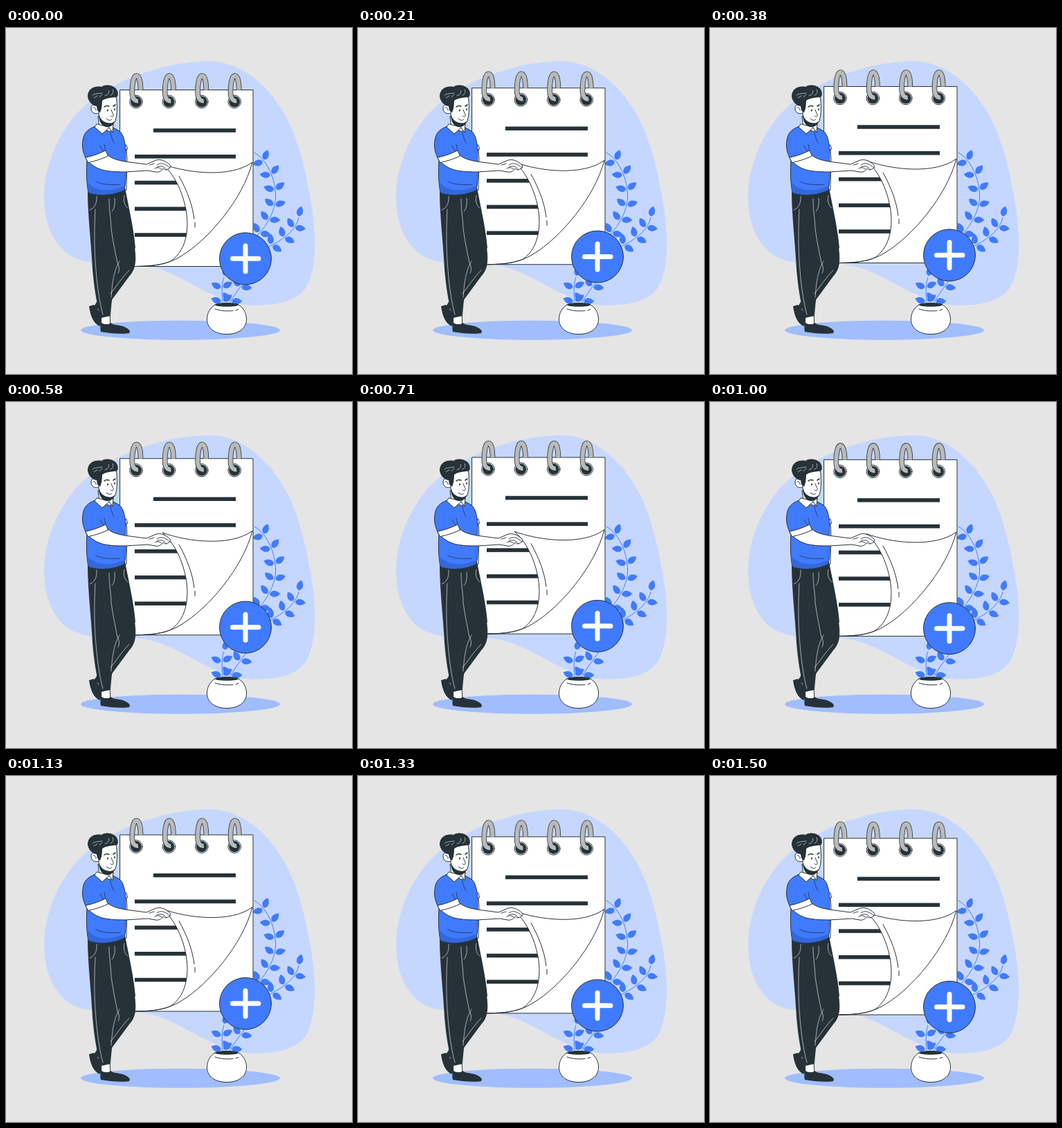
An HTML page for the animation above (1540 ms loop, 500 px wide and 500 px high).

```html
<!DOCTYPE html>
<html lang="en">
<head>
<meta charset="utf-8">
<title>Notepad</title>
<style>
  html, body { margin: 0; height: 100%; overflow: hidden; background: #e5e5e5; }
  svg { display: block; width: 100%; height: 100%; }
  .ink { fill: #263238; }
  .blue { fill: #407bff; }
  .shade { fill: #3467d8; }
  .paper { fill: #fff; }
  .edge { stroke: #263238; stroke-linejoin: round; stroke-linecap: round; }
  .line { fill: none; stroke: #263238; stroke-linecap: round; stroke-linejoin: round; }
  .seam { fill: none; stroke: #dfe3e5; stroke-width: .7; stroke-linecap: round; }
  .stem { fill: none; stroke: #407bff; }
  .wire { fill: none; }
</style>
</head>
<body>
<svg viewBox="0 0 500 500">
  <defs>
    <path id="leaf" d="M2 0C3-5 10-8 17 0C11 6 4 5 2 0Z"/>
    <path id="wire" class="wire" d="M6.500 89.500C6.500 77 4 69 .5 69C-4 69-6 82-5.700 94C-5.500 102-2 106 3 105.500"/>
    <g id="ring">
      <circle class="paper edge" cy="106.500" r="9.300"/>
      <circle class="ink" cy="106.500" r="8"/>
      <use href="#wire" stroke="#263238" stroke-width="7.600"/>
      <use href="#wire" stroke="#bababa" stroke-width="6"/>
    </g>
  </defs>

  <path fill="#c6d7ff" d="M290 48C340 46 380 84 404 127C425 166 435 215 442 258C449 305 448 350 434 374C421 396 385 403 345 400C290 390 260 360 215 346C190 338 160 339 120 338C78 333 55 295 55 243C56 200 72 160 100 126C128 96 170 72 215 60C240 52 265 49 290 48Z"/>
  <ellipse cx="252" cy="436.700" rx="144" ry="14" fill="#a0bdff"/>

  <g id="plant"></g>

  <g id="pad">
    <path class="paper edge" d="M165 89.500H357V344.500H165Z"/>
    <g id="bars" class="ink"></g>
    <path class="paper" d="M226 196.500C262 210 325 217 356 194C342 248 292 306 238 338C264 319 264 284 260 262C255 236 243 211 226 196.500Z"/>
    <path class="line" d="M187 344.500C214 344 226 342 238 337C264 319 264 284 260 262C255 236 243 211 226 196.500C262 210 325 217 356 194C342 248 292 306 254 329C236 341 214 344.500 187 344.500M250 214C262 236 269 254 272 276M273 281V288"/>
    <g id="rings"></g>
    <circle class="blue edge" cx="346" cy="333.300" r="37.500"/>
    <path d="M327.500 333.300H365M346 314.800V351.800" stroke="#fff" stroke-width="7" stroke-linecap="round"/>
  </g>

  <g id="pot">
    <path class="paper edge" d="M302 400C295 404 290.500 412 290.500 421C290.500 434 302 442.500 319 442.500C336 442.500 347.500 434 347.500 421C347.500 412 343 404 336 400C331 396.500 307 396.500 302 400Z"/>
    <ellipse class="ink" cx="319" cy="400.200" rx="16.500" ry="2.600"/>
    <path class="line" d="M302 406C310 409 320 409.500 328 408.500M332 408L336 406.500"/>
  </g>

  <g id="man">
    <path class="paper edge" d="M169 176L174 176C176 194 174 214 174 234L169 236Z"/>
    <path class="paper edge" d="M168 170L174 169L175.500 175.500L169 177Z"/>

    <path class="ink" d="M120 402L127 400L137 412L139 424L136 431C127 428 122 417 120 402Z"/>
    <path class="ink" d="M140 240L172 234C178 265 185 300 187 326C188 342 186 350 178 359L141 409L126 404L154 360Z"/>
    <path class="paper edge" d="M138 414L150 413L151 429L138 428Z"/>
    <path class="ink" d="M138 426C142 429 147 430 151 426C156 430 163 429 169 431C177 434 181 438 178 441C165 443 150 441 137 439C136 434 136 430 138 426Z"/>
    <path class="ink" d="M118 236L172 231C178 262 185 292 187 318L164 339C157 356 153 390 151 416L137 419C130 395 127 371 125 349C123 310 118 270 118 236Z"/>
    <path class="seam" d="M152 389C154 362 157 349 164 337M162 341C164 347 164 351 162 354M131 243C132 256 126 261 121 263M129 262C127 300 128 325 130 350C132 375 135 395 140 414M149 247C149 266 152 277 152 290C154 305 158 325 161 340M157 246C158 256 156 262 153 265M171 242C169 252 172 257 176 260M178 350C168 360 159 374 151 384"/>

    <path class="blue edge" d="M129 142C118 146 112 152 111 163C109 174 113 184 117 191C116 207 116 222 119 238C135 244 158 241 171 234C175 216 172 192 173 176C172 163 169 153 164 149L153 143Z"/>
    <path class="shade" d="M117 222C130 238 152 237 171.500 228L170.500 234C154 242 133 243 119 237.500Z"/>
    <path class="line" d="M130 222C141 227 153 227 165 226M142 168C143 174 144 178 144 181M151 151C152 158 154 162 156 166M136 170C138 174 140 177 142 179" stroke-width=".8"/>

    <path class="paper edge" d="M119 193L146 183C152 188 160 191 172 193L203 197L217 191C223 189 231 192 237 198C239 201 237 203 235 203C232 206 229 205 227 203C224 207 220 209 216 208L205 206L172 208C157 208 144 207 136 204C128 201 123 197 119 193Z"/>
    <path class="line" d="M218 198C223 194 229 195 237 202M218 201C224 198 228 200 232 205M215 203C220 200 224 203 226 205M207 198L214 196" stroke-width=".9"/>
    <path class="paper edge" d="M115 187C126 185 136 181 144 177L147.500 185C139 189 130 192 119 194.500Z"/>

    <path class="paper edge" d="M133 128L135 144L151 150L155 140Z"/>
    <path class="paper edge" d="M131 139L128 143L139 153L149 144L154 151L155 139L149 143Z"/>
    <path class="paper edge" d="M133 104C132 118 134 132 140 138C146 143 154 141 158 134C161 125 161 110 159 98L144 94Z"/>
    <path class="paper edge" d="M133 114C128 108 122 111 123 117C124 123 129 125 134 123Z"/>
    <path class="ink" d="M134 124C136 132 141 136 147 137C151 138 155 137 158 134C155 141 148 145 142 142C136 139 134 132 134 124Z"/>
    <path class="ink" d="M131 113C124 112 119 106 118 99C118 89 126 83 138 85C145 80 158 83 161 91C163 97 161 101 157 100C149 101 143 102 139 105C139 112 138 118 136 122L132 119Z"/>
    <path class="seam" d="M125 97C130 94 135 95 139 94M127 101L132 98M135 100L139 96M143 98C148 97 150 92 148 90M151 97C155 96 156 92 154 89"/>
    <path class="line" d="M126 115C128 114 130 116 130 119M152 118C153 122 156 125 155 127C154 129 152 128 151 127M145 131C148 134 151 134 153 132"/>
    <path class="line" d="M142 114C144 112 146 112 149 113M155 113L158 111" stroke-width="1.600"/>
    <ellipse class="ink" cx="147" cy="119" rx="1" ry="1.600"/>
    <ellipse class="ink" cx="157" cy="117.500" rx="1" ry="1.600"/>
  </g>
</svg>
<script>
  const byId = id => document.getElementById(id);
  const repeat = (count, make) => Array.from({ length: count }, (_, i) => make(i)).join('');

  byId('rings').innerHTML = repeat(4, i => `<use href="#ring" x="${188 + 47.4 * i}"/>`);
  byId('bars').innerHTML = repeat(5, i => {
    const left = i ? 186 : 213, right = i < 2 ? 332 : 262;
    return `<rect x="${left}" y="${145.2 + 37.75 * i}" width="${right - left}" height="5.6"/>`;
  });

  // A stem with evenly spaced pairs of leaves and one leaf at its tip
  function growStem(d, pairs) {
    const plant = byId('plant');
    const stem = document.createElementNS('http://www.w3.org/2000/svg', 'path');
    stem.setAttribute('class', 'stem');
    stem.setAttribute('d', d);
    plant.append(stem);
    const length = stem.getTotalLength();

    const leafAt = (distance, turn) => {
      const { x, y } = stem.getPointAtLength(distance);
      const before = stem.getPointAtLength(distance - 1);
      const angle = Math.atan2(y - before.y, x - before.x) * 180 / Math.PI + turn;
      plant.insertAdjacentHTML('beforeend',
        `<use href="#leaf" class="blue" transform="translate(${x} ${y}) rotate(${angle})"/>`);
    };
    leafAt(length, 0);
    for (let i = 0; i < pairs; i++) {
      const distance = length * (1 - (i + 0.8) / pairs);
      leafAt(distance, 58);
      leafAt(distance, -68);
    }
  }
  growStem('M363 300C384 278 392 253 389 235C387 213 376 190 359 180', 6);
  growStem('M380 316C402 305 419 292 423 274', 3);
  growStem('M313 400C311 374 313 366 315 360', 2);
  growStem('M322 400C329 386 338 376 350 358', 2);

  const LOOP = 1540, FPS = 24, LAST = 36, PEAK = 17.5;
  const pad = byId('pad');
  const start = performance.now();

  // Linear float up and down, stepped at 24 fps on a 10 ms clock
  function draw() {
    const time = (performance.now() - start) % LOOP;
    const step = Math.min(LAST, Math.floor((time + 5) * FPS / 1000));
    const y = (Math.abs(step - PEAK) - PEAK) / 1.8;
    pad.setAttribute('transform', `translate(0 ${y.toFixed(3)})`);
    requestAnimationFrame(draw);
  }
  draw();
</script>
</body>
</html>
```
